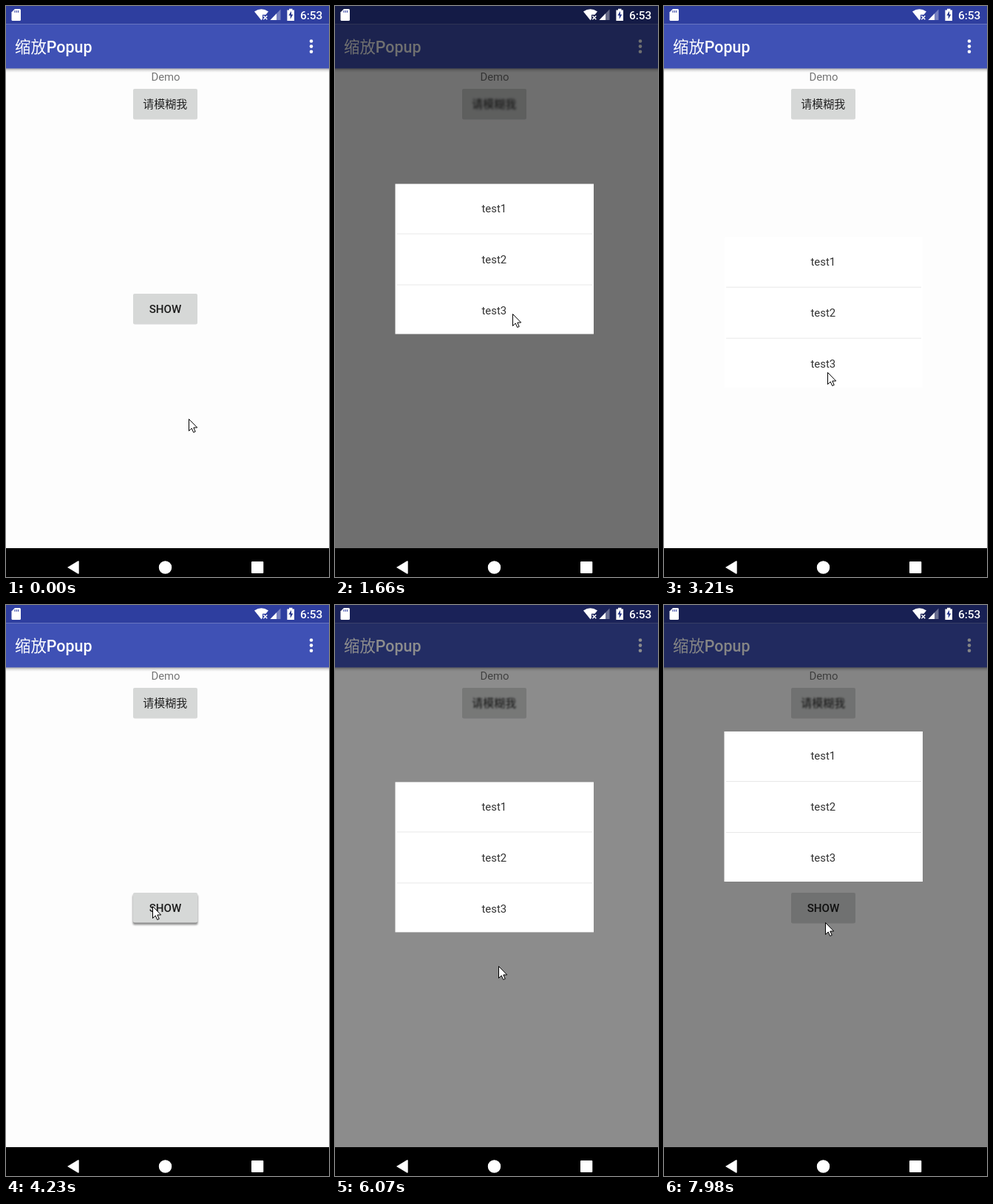
Animation, 437 px wide and 772 px high, one loop 8000 ms. Source, as an HTML page:

```html
<!DOCTYPE html>
<html lang="zh">
<head>
<meta charset="utf-8">
<title>缩放Popup</title>
<style>
  html, body { margin: 0; width: 100%; height: 100%; overflow: hidden; background: #000; }
  svg { display: block; width: 100vw; height: 100vh; }
  text { font: 400 14.9px Roboto, "Noto Sans CJK SC", "Noto Sans CJK", sans-serif; }
  .mid { text-anchor: middle; }
  .bold { font-weight: 500; }
  .title { font-size: 21.4px; }
  .face { fill: #d6d8d7; }
  .item { fill: #333; }
</style>
</head>
<body>
<svg viewBox="0 0 437 772" preserveAspectRatio="none">
  <defs>
    <linearGradient id="drop" x2="0" y2="1">
      <stop offset="0" stop-color="#000" stop-opacity=".32"/>
      <stop offset=".5" stop-color="#000" stop-opacity=".1"/>
      <stop offset="1" stop-color="#000" stop-opacity="0"/>
    </linearGradient>
    <filter id="soft" x="-20%" y="-50%" width="140%" height="200%"><feGaussianBlur stdDeviation="1.3"/></filter>
  </defs>

  <rect width="437" height="733" fill="#fdfdfd"/>
  <rect width="437" height="24.5" fill="#2e3e9f"/>
  <rect y="24.5" width="437" height="60" fill="#3f51b5"/>
  <rect y="84.5" width="437" height="5.5" fill="url(#drop)"/>
  <text class="title" x="12" y="63" fill="#fff">缩放<tspan class="bold">Popup</tspan></text>
  <g fill="#fff">
    <circle cx="413" cy="47.5" r="2.3"/><circle cx="413" cy="54.6" r="2.3"/><circle cx="413" cy="61.7" r="2.3"/>
  </g>
  <text class="mid" x="216" y="101" fill="#757575">Demo</text>

  <rect x="172" y="112.8" width="87" height="40.7" rx="2.5" fill="#000" opacity=".14"/>
  <rect class="face" x="172" y="112" width="87" height="40.4" rx="2"/>
  <text id="label" class="mid" x="215.3" y="137.5" fill="#222" style="font-size:15px">请模糊我</text>

  <rect x="172" y="389.8" width="87" height="40.7" rx="2.5" fill="#000" opacity=".14"/>
  <rect id="lift" x="171.5" y="391.5" width="88" height="41" rx="2.5" fill="#000" filter="url(#soft)"/>
  <rect class="face" x="172" y="389" width="87" height="40.6" rx="2"/>
  <text class="mid bold" x="215.5" y="414.5" fill="#1c1c1c" style="font-size:15.1px">SHOW</text>

  <rect id="dim" width="437" height="733"/>

  <g fill="#fff">
    <path d="M12 4h6.5a1.5 1.5 0 0 1 1.5 1.5v13a1.5 1.5 0 0 1-1.5 1.5h-9.5a1.5 1.5 0 0 1-1.5-1.5V8.6z"/>
    <path d="M336 7.5Q345.500 1 355 7.500L351.500 11.700H347V17.500L345.500 19.300z"/>
    <path d="M371.500 4.500V19H357.500z" opacity=".35"/>
    <path d="M366 10.200V19H357.500z"/>
    <path d="M383 5.500V3.700h4.500v1.800h2.500v14.500h-9.600V5.500z"/>
    <text class="bold" x="398" y="17.600" style="font-size:15.400px">6:53</text>
  </g>
  <path d="M348.300 13.200l5 5m0-5l-5 5" stroke="#fff" stroke-width="1.500"/>
  <path d="M12 6v3m2.300-3v3m2.300-3v3" stroke="#2e3e9f"/>
  <path d="M386 6.800l-3.600 6h2.300v5l3.600-6.400h-2.300z" fill="#26358c"/>

  <g id="popup">
    <rect x="81.500" width="268.500" height="203" fill="#fff"/>
    <path d="M84 67.500H348M84 136.500H348" stroke="#e8e8e8"/>
    <text class="mid item" x="215.300" y="38.400">test1</text>
    <text class="mid item" x="215.300" y="107.400">test2</text>
    <text class="mid item" x="215.300" y="176.400">test3</text>
  </g>

  <rect y="733" width="437" height="39" fill="#000"/>
  <g fill="#fff">
    <path d="M83 759L97.500 750.300Q98.700 749.900 98.700 751.200V766.800Q98.700 768.100 97.500 767.700z"/>
    <circle cx="215.500" cy="759" r="8.700"/>
    <rect x="332" y="751" width="16.300" height="16" rx="1"/>
  </g>
  <path id="cursor" d="M.5 .5V16.500L4.200 13L6.700 18.500L9.200 17.400L6.800 12H11.700z" fill="#fff" stroke="#000"/>
</svg>
<script>
const LOOP = 8000;
const MOVE = 800, TRAVEL = 167, REST = 250, TENSION = 5;
const DIM_IN = 700, DIM_OUT = 560, DIM_MAX = 0.56;

// tap: button press, open: popup enters, fade: dim leaves, close: popup leaves
const shows = [
  { tap: 900, open: 953, fade: 2640, close: 2762 },
  { tap: 4230, open: 4325, fade: 5960, close: 6042 },
  { tap: 7430, open: 7548, fade: Infinity, close: Infinity }
];

// time, x, y of the pointer tip
const track = [
  [0, 247, 558], [180, 247, 558], [360, 272, 515], [540, 264, 450], [720, 240, 416],
  [1700, 240, 416], [1920, 221, 495],
  [3480, 221, 495], [3800, 198, 407],
  [4600, 198, 407], [5030, 213, 449], [5400, 221, 488],
  [6500, 221, 488], [6750, 219, 460], [7280, 218, 429], [LOOP, 218, 429]
];

const [label, lift, dim, popup, cursor] =
  ["label", "lift", "dim", "popup", "cursor"].map(id => document.getElementById(id));

const clamp = v => Math.min(1, Math.max(0, v));

function overshoot(t, tension) {
  const s = t - 1;
  return s * s * ((tension + 1) * s + tension) + 1;
}

function pointer(t) {
  const i = track.findIndex(p => p[0] > t);
  const a = track[i - 1], b = track[i];
  const k = (t - a[0]) / (b[0] - a[0]);
  return [1, 2].map(n => a[n] + (b[n] - a[n]) * k);
}

function popupY(t, s) {
  return t < s.close
    ? REST + TRAVEL * (1 - overshoot(clamp((t - s.open) / MOVE), TENSION))
    : REST + TRAVEL * overshoot(clamp((t - s.close) / MOVE), -TENSION);
}

function render(t) {
  const s = shows.filter(v => t >= v.tap).pop();
  let shade = 0, press = 0, open = false;
  if (s) {
    const rise = 1 - (1 - clamp((t - s.open) / DIM_IN)) ** 2;
    shade = rise * (1 - clamp((t - s.fade) / DIM_OUT));
    press = 1 - clamp((t - s.tap - 100) / 150);
    open = t >= s.open && t < s.close + MOVE;
    if (open) popup.setAttribute("transform", `translate(0 ${popupY(t, s).toFixed(1)})`);
  }
  popup.style.display = open ? "" : "none";
  dim.setAttribute("opacity", shade * DIM_MAX);
  lift.setAttribute("opacity", press * 0.4);
  label.style.filter = shade > 0.02 ? `blur(${(shade * 1.5).toFixed(2)}px)` : "none";
  cursor.setAttribute("transform", `translate(${pointer(t).map(Math.round)})`);
}

function tick() {
  render(performance.now() % LOOP);
  requestAnimationFrame(tick);
}
tick();
</script>
</body>
</html>
```
